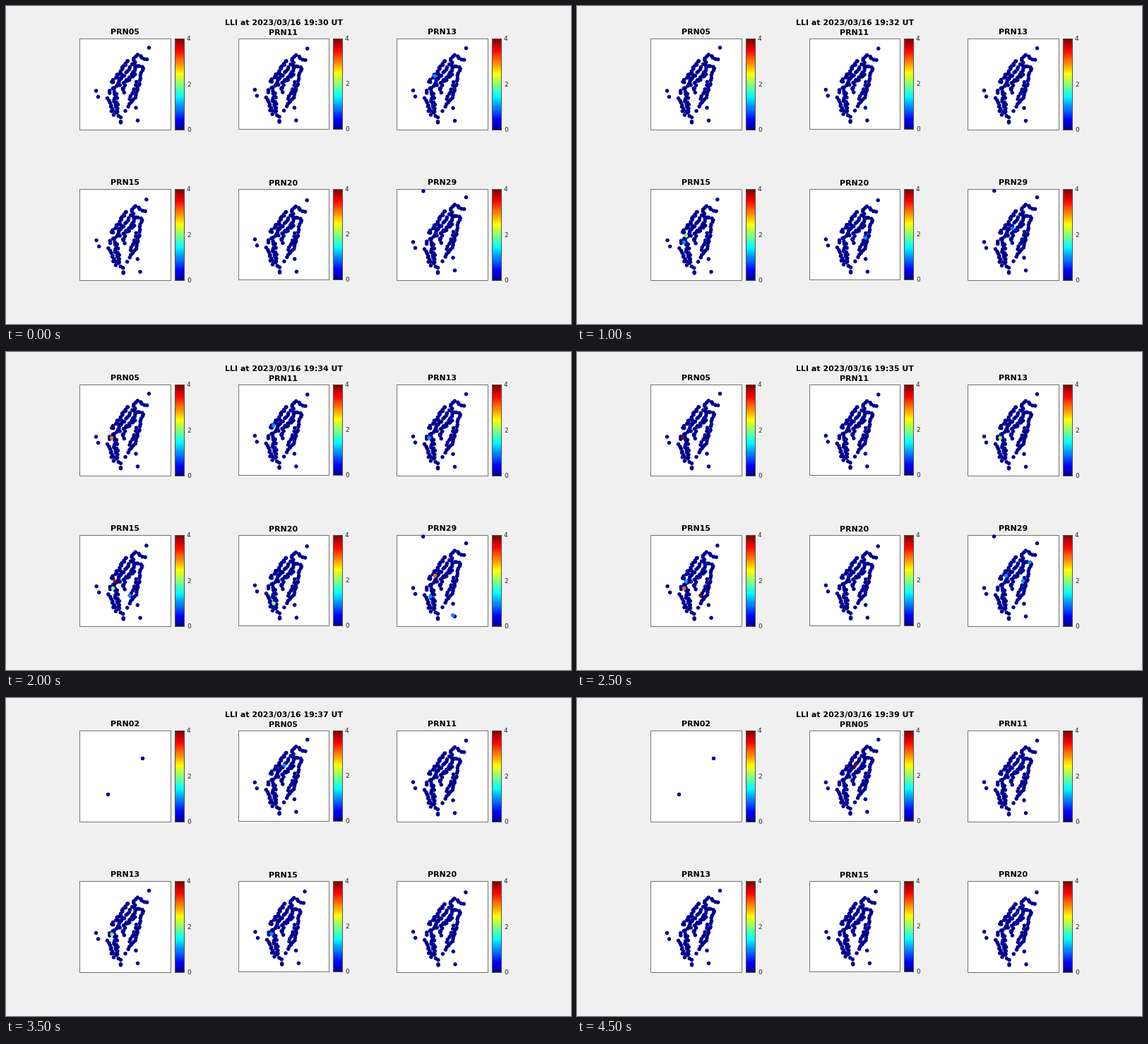
These frames come from a looping animation (800 by 450 pixels, 5 s). A matplotlib script:

```python
import numpy as np
import matplotlib.pyplot as plt
from matplotlib.animation import FuncAnimation
from matplotlib.patches import Rectangle

W, H, DPI = 800, 450, 100
MINUTES, STEP = 10, 500
PX = 72 / DPI
EARLY = ["05", "11", "13", "15", "20", "29"]
LATE = ["02"] + EARLY[:5]

# Outlying stations, then strands of stations that follow a line
LONE = [(98, 12.5), (23, 73.5), (26, 82), (79.5, 97.5), (82, 115.5),
        (58, 117), (58, 118.3), (58, 111), (64.5, 102)]
STRANDS = [
    (11, [(79, 40), (76, 29), (83, 23), (94, 30)]),
    (8, [(82, 39), (90, 40), (86, 55)]),
    (13, [(84, 60), (79, 82), (69, 96)]),
    (7, [(80, 62), (76, 74), (71, 86)]),
    (16, [(68, 30), (55, 50), (45, 62)]),
    (15, [(74, 36), (66, 47), (52, 65), (41, 77)]),
    (12, [(77, 45), (63, 62), (62, 76)]),
    (5, [(79, 49), (69, 60)]),
    (6, [(59, 51), (55, 62), (60, 69)]),
    (8, [(39, 84), (43, 93), (47, 107)]),
    (13, [(50, 71), (49, 86), (54, 108)]),
    (6, [(51, 78), (55, 99), (49, 101)]),
]

# Lean and tilt of the island as each satellite sees it
VIEW = {"05": (0, 0), "11": (0, 0.03), "13": (0, 0.015),
        "15": (0.07, 0.045), "20": (0.01, 0.07), "29": (0, -0.03)}

# Satellite, x, y, peak minute, then peak level, rise and fall per minute
ALERTS = [
    ("05", 45, 75, 5, 4, 1.4), ("05", 65, 49, 9, 4, 1.4),
    ("11", 49.5, 58, 4), ("11", 79.5, 70, 8),
    ("13", 53.5, 52.5, 0), ("13", 45.7, 75, 6, 4, 1.5, 1.5),
    ("15", 50, 65.5, 4, 4, 1, 3), ("15", 47, 75, 5, 3, 0.7, 1),
    ("15", 70.5, 85, 5, 4, 3, 3),
    ("20", 79.5, 69, 2), ("20", 50, 97, 4, 2),
    ("29", 63, 55.5, 2), ("29", 54, 57, 4, 3, 4, 2), ("29", 47.5, 86.5, 4),
    ("29", 79, 113, 4), ("29", 87.5, 38, 5), ("29", 78, 64.5, 5),
]


def strand(n, pts):
    """n points at even distances along a line."""
    pts = np.array(pts, float)
    d = np.r_[0, np.cumsum(np.hypot(*np.diff(pts, axis=0).T))]
    t = np.linspace(0, d[-1], n)
    return np.c_[np.interp(t, d, pts[:, 0]), np.interp(t, d, pts[:, 1])]


def level(k, peak_at, peak=1, rise=4, fall=4):
    slope = rise if k < peak_at else fall
    return max(0, round(peak - slope * abs(k - peak_at)))


def jet64():
    n = np.arange(1, 65)
    ramp = [np.minimum(n - c + 16, c + 32 - n) / 16 for c in (40, 24, 8)]
    return np.clip(ramp, 0, 1).T


rng = np.random.default_rng(8)
inland = np.vstack([strand(n, p) for n, p in STRANDS])
STATIONS = np.vstack([LONE, inland + rng.uniform(-1.4, 1.4, inland.shape)])
JET = jet64()


def cloud_at(prn, k):
    """Station positions and levels for one satellite in one minute."""
    if prn == "02":
        pts = [(64, 64.5)] if k == 6 else [(89, 39), (40, 90)]
        return np.array(pts), np.zeros(len(pts), int)
    lean, tilt = VIEW[prn]
    x, y = STATIONS.T
    pts = np.c_[x + lean * (y - 65), y + tilt * (x - 55)]
    if prn == "29":
        pts = np.vstack([pts, (37.5 - 0.1 * k, 2.5 - 0.2 * k)])
    levels = np.zeros(len(pts), int)
    for sat, ax_, ay, *pulse in ALERTS:
        if sat == prn and level(k, *pulse):
            pts = np.vstack([pts, (ax_, ay)])
            levels = np.append(levels, level(k, *pulse))
    return pts, levels


fig = plt.figure(figsize=(W / DPI, H / DPI), dpi=DPI, facecolor="#f0f0f0")
ax = fig.add_axes([0, 0, 1, 1])
ax.axis("off")


def label(x, y, s, size=11, **kw):
    return ax.text(x, y, s, fontsize=size * PX, family="DejaVu Sans",
                   va="baseline", **kw)


def outline(x, y, w, h, fill, edge):
    ax.add_patch(Rectangle((x + 0.5, y + 0.5), w, h, facecolor=fill, edgecolor=edge,
                           linewidth=PX, snap=False, zorder=2))


def make_panel(x, y, side, drop):
    outline(x, y, side, side, "white", "#737373")
    bar = x + side + 6
    ax.imshow(JET[::-1, None], extent=(bar, bar + 14, y + side + 1, y),
              aspect="auto", interpolation="nearest", zorder=1)
    outline(bar, y, 13, side, "none", "#505050")
    for v in (0, 2, 4):
        label(bar + 17, y + side * (1 - v / 4) + 3.2, str(v), 9, color="#262626")
    name = label(x + side / 2 - 0.2, y - 6 + drop, "", weight="bold", ha="center")
    dots = ax.scatter([], [], s=(5.5 * PX) ** 2, linewidths=0, zorder=3,
                      clip_on=False, snap=False)
    return name, dots


# The middle column is one pixel smaller and its titles sit one pixel lower
BOXES = [(x, y, 129 - mid, mid) for y in (46, 259)
         for x, mid in ((104, 0), (329, 1), (553, 0))]
panels = [make_panel(*b) for b in BOXES]
clock = label(393.3, 27, "", weight="bold", ha="center")
ax.set_xlim(0, W)
ax.set_ylim(H, 0)


def draw(k):
    clock.set_text(f"LLI at 2023/03/16 19:{30 + k} UT")
    sats = EARLY if k < 6 else LATE
    for (name, dots), (x, y, side, _), prn in zip(panels, BOXES, sats):
        pts, levels = cloud_at(prn, k)
        name.set_text("PRN" + prn)
        dots.set_offsets(pts * side / 129 + (x + 0.5, y + 0.5))
        dots.set_facecolor(JET[np.minimum(levels * 16, 63)])
    return []


anim = FuncAnimation(fig, draw, frames=MINUTES, interval=STEP, repeat=True)
plt.show()
```
